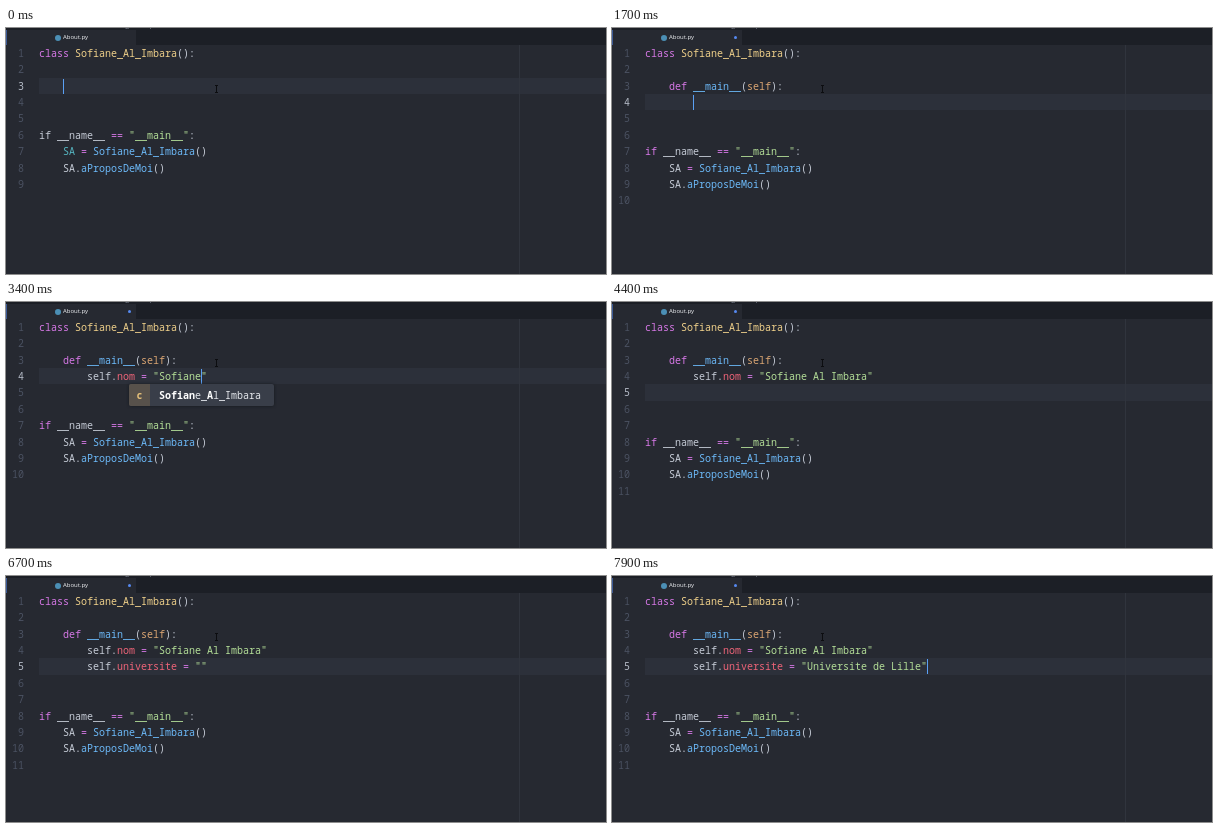
An HTML page that plays this animation: 600 px wide and 246 px high, repeating every 8 s.

```html
<!DOCTYPE html>
<html lang="fr">
<head>
<meta charset="utf-8">
<title>About.py</title>
<style>
  html, body { margin: 0; width: 100%; height: 100%; overflow: hidden; background: #262931; }
  #stage {
    position: relative; width: 600px; height: 246px; overflow: hidden; background: #262931;
    font: 500 10px/16.4px "Noto Sans Mono", "DejaVu Sans Mono", monospace; color: #c6ccd7;
  }
  #stage div, #stage i { position: absolute; white-space: pre; }
  i { font-style: normal; }

  #bar { left: 0; top: 0; width: 600px; height: 17px; background: #1c1f26; overflow: hidden; }
  #menu { left: 5px; top: -6px; font: 6px/8px "Open Sans", sans-serif; color: #9da5b4; word-spacing: 4px; }
  #tab { left: 0; top: 2px; width: 130px; height: 15px; background: #262931; border-left: 1px solid #3d5c9a; box-sizing: border-box; }
  #badge { left: 48px; top: 5px; width: 6px; height: 6px; border-radius: 50%; background: #4b8fb5; }
  #name { left: 56px; top: 3px; font: 500 6px/9px "Open Sans", sans-serif; color: #f2f4f7; }
  #dot { left: 121px; top: 6px; width: 3.4px; height: 3.4px; border-radius: 50%; background: #568af2; }

  #guide { left: 513px; top: 17px; width: 1px; height: 229px; background: #30343d; }
  #active { left: 33px; width: 567px; height: 16.4px; background: #2c303a; }
  #caret { width: 1px; height: 15px; background: #5aa0f5; }
  .num { left: 0; width: 18px; text-align: right; color: #4b5262; }
  .num.on { color: #b4bac6; }
  .code { left: 33px; }

  .kw { color: #d678e6; }
  .cls { color: #efd08a; }
  .fn { color: #6cb9f8; }
  .str { color: #b4df98; }
  .arg { color: #dba673; }
  .attr { color: #ee6478; }
  .new { color: #56b6c2; }

  #popup { background: #20242b; border-radius: 2px; box-shadow: 0 0 3px #15181d; overflow: hidden; }
  .row { left: 0; width: 100%; height: 22px; line-height: 22px; color: #a6bad3; }
  .row.on { background: #393e49; color: #e4e7ec; }
  .row b { color: #fff; }
  .row span { position: absolute; left: 30px; }
  .row i { left: 0; width: 21px; height: 22px; text-align: center; font-weight: 700; color: #e8c27a; background: #57514b; }

  #mouse { position: absolute; left: 208px; top: 57px; width: 5px; height: 8px; }
</style>
</head>
<body>
<div id="stage">
  <div id="bar">
    <div id="menu">File Edit View Selection Find Packages Help</div>
    <div id="tab"><i id="badge"></i><i id="name">About.py</i><i id="dot"></i></div>
  </div>
  <div id="active"></div>
  <div id="guide"></div>
  <div id="text"></div>
  <div id="caret"></div>
  <svg id="mouse" viewBox="0 0 5 8"><path d="M1 .5H4M2.5 .5V7.5M1 7.5H4" stroke="#0c0d10" fill="none"/></svg>
  <div id="popup"></div>
</div>
<script>
const LOOP = 8000, STEP = 100, TOP = 16.8, LINE = 16.4, LEFT = 33, CHAR = 6, ROW = 22;
const CLASS = 'Sofiane_Al_Imbara';
const $ = id => document.getElementById(id);

// Typing: start, end, row, text, text kept after the caret
const typing = [
  [-100, -100, 0, '    '],
  [100, 400, 0, 'def '],
  [600, 900, 0, '__ma'],
  [1000, 1000, 0, 'in__'],
  [1100, 1400, 0, '(self', ')'],
  [1500, 1600, 0, '):'],
  [1700, 1700, 1, '        '],
  [1900, 2200, 1, 'self.'],
  [2800, 3000, 1, 'nom'],
  [3100, 3200, 1, ' = "', '"'],
  [3300, 3400, 1, 'Sofiane', '"'],
  [3500, 3700, 1, ' Al', '"'],
  [3800, 4000, 1, ' Imbara', '"'],
  [4100, 4100, 1, '"'],
  [4200, 4200, 2, '        '],
  [4800, 5200, 2, 'self.'],
  [5500, 6000, 2, 'universite'],
  [6100, 6500, 2, ' = "', '"'],
  [6800, 7200, 2, 'Universite de ', '"'],
  [7300, 7600, 2, 'Lille', '"'],
  [7800, 7800, 2, '"']
];

// Suggestions: first and last step, row, column of the word, items
const selfItems = ['<b>se</b>lf', '<b>se</b>t', 'UnicodeTran<b>s</b>lat<b>e</b>Error'];
const popups = [
  [200, 400, 0, 4, ['<b>de</b>f', '<b>de</b>l', '__<b>de</b>bug__']],
  [700, 900, 0, 8, ['__<b>m</b>ain__', '__na<b>m</b>e__', 'Sofiane_Al_I<b>m</b>bara']],
  [2000, 2100, 1, 8, selfItems],
  [2800, 3000, 1, 13, ['<b>n</b>ext', '<b>n</b>ot', '<b>N</b>one']],
  [3300, 3400, 1, 20, ['<b>Sofian</b>e_<b>A</b>l_Imbara']],
  [3600, 3700, 1, 28, ['Sofiane_<b>Al</b>_Imbara', '<b>A</b>rithmeticError', 'PendingDeprec<b>a</b>tionWarning']],
  [3900, 4000, 1, 31, ['Sofiane_Al_<b>Im</b>bara']],
  [4900, 5100, 2, 8, selfItems],
  [5600, 5900, 2, 13, ['<b>Uni</b>codeError', '<b>Uni</b>codeTranslateError']]
];

const rules = [
  ['str', /"[^"]*"?/y],
  ['kw', /(class|def|if)\b|==?/y],
  ['fn', /__main__/y],
  ['cls', /(?<=class )\w+/y],
  ['fn', /\w+(?=\(\))/y],
  ['arg', /(?<=\()self/y],
  ['attr', /(?<=self\.)\w+/y],
  ['', /\w+|\W/y]
];

function paint(line) {
  let html = '', at = 0;
  while (at < line.length) {
    for (const [kind, rule] of rules) {
      rule.lastIndex = at;
      const hit = rule.exec(line);
      if (!hit) continue;
      html += kind ? `<span class="${kind}">${hit[0]}</span>` : hit[0];
      at += hit[0].length;
      break;
    }
  }
  return html;
}

const lineTop = n => TOP + n * LINE;
const plain = html => html.replace(/<.*?>/g, '');

function typedAt(t) {
  const rows = [];
  let tail = '', row = 0, lastKey = 0;
  for (const [start, end, r, text, after = ''] of typing) {
    if (t < start) break;
    const share = Math.min(1, (t - start + STEP) / (end - start + STEP));
    rows[r] = (rows[r] || '') + text.slice(0, Math.ceil(text.length * share));
    tail = after;
    row = r;
    lastKey = Math.min(t, end);
  }
  return { rows, row, tail, idle: t - lastKey };
}

function drawPopup(t) {
  const found = popups.find(([a, b]) => t >= a && t <= b);
  const box = $('popup');
  box.style.display = found ? 'block' : 'none';
  if (!found) return;
  const [, , row, col, items] = found;
  const longest = Math.max(...items.map(s => plain(s).length));
  box.style.left = LEFT + col * CHAR - 30 + 'px';
  box.style.top = lineTop(row + 3) + 'px';
  box.style.width = 43 + longest * CHAR + 'px';
  box.style.height = items.length * ROW + 'px';
  box.innerHTML = items.map((s, i) => {
    const icon = plain(s) === CLASS ? '<i>c</i>' : '';
    return `<div class="row${i ? '' : ' on'}" style="top:${i * ROW}px">${icon}<span>${s}</span></div>`;
  }).join('');
}

function draw(t) {
  const { rows, row, tail, idle } = typedAt(t);
  const col = rows[row].length;
  rows[row] += tail;
  const lines = [`class ${CLASS}():`, '', ...rows, '', '',
    'if __name__ == "__main__":', `    SA = ${CLASS}()`, '    SA.aProposDeMoi()', ''];
  const active = row + 2;

  $('text').innerHTML = lines.map((line, n) => {
    let html = paint(line);
    // Highlighting settles with the first key
    if (t === 0) {
      html = html.replace('<span class="kw">if</span>', 'if').replace('SA <', '<span class="new">SA</span> <');
    }
    const top = `style="top:${lineTop(n)}px"`;
    return `<div class="num${n === active ? ' on' : ''}" ${top}>${n + 1}</div><div class="code" ${top}>${html}</div>`;
  }).join('');

  $('active').style.top = lineTop(active) + 'px';
  const caret = $('caret').style;
  caret.left = LEFT + col * CHAR + 'px';
  caret.top = lineTop(active) + 1 + 'px';
  caret.visibility = idle % 400 < 200 ? 'visible' : 'hidden';
  $('dot').style.visibility = t ? 'visible' : 'hidden';
  drawPopup(t);
}

const begin = performance.now();
let shown = -1;
function tick() {
  const t = Math.floor((performance.now() - begin) % LOOP / STEP) * STEP;
  if (t !== shown) draw(shown = t);
  requestAnimationFrame(tick);
}
tick();
</script>
</body>
</html>
```
